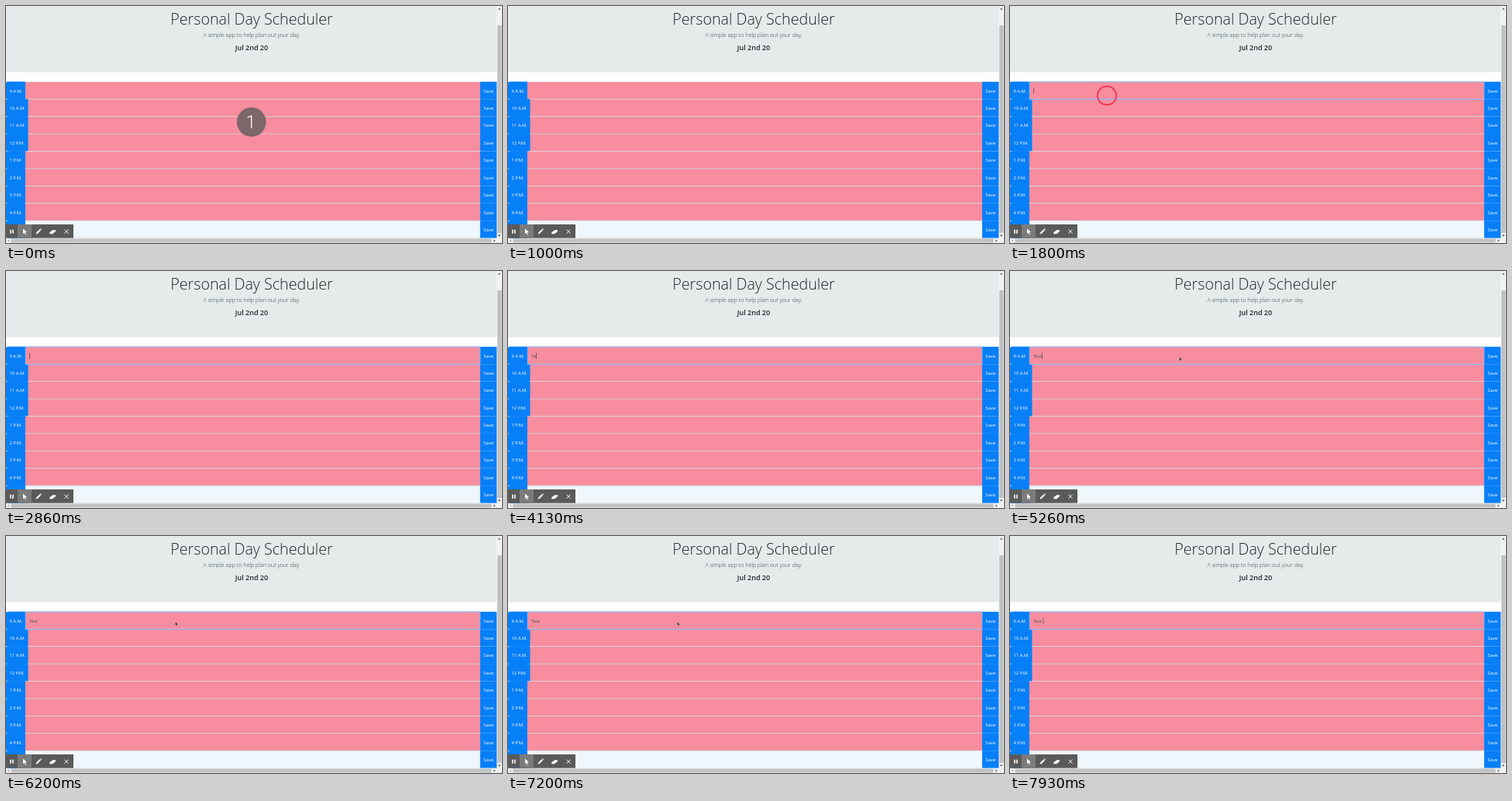
These frames come from a looping animation (640x306 px, 8000 ms). An HTML page:

```html
<!DOCTYPE html>
<html lang="en">
<head>
<meta charset="utf-8">
<title>Personal Day Scheduler</title>
<style>
  html, body { margin: 0; width: 100%; height: 100%; overflow: hidden; background: #fff; }
  svg { display: block; width: 640px; height: 306px; }
  text { font-family: "Open Sans", "Noto Sans", sans-serif; font-size: 5.9px; fill: #fff; }
  .title { font-size: 19.7px; font-weight: 300; fill: #212529; }
  .lead { font-size: 7.15px; font-weight: 300; fill: #343a40; }
  .date { font-size: 9px; font-weight: 600; fill: #212529; }
  .mid { text-anchor: middle; }
  .entry { fill: #495057; white-space: pre; }
  .count { font: 300 23px Roboto, "Open Sans", sans-serif; }
</style>
</head>
<body>
<svg viewBox="0 0 640 306">
  <rect width="640" height="306" fill="#fff"/>
  <rect width="633.5" height="85.5" fill="#e4ebea"/>
  <text class="title mid" x="317" y="24">Personal Day Scheduler</text>
  <text class="lead mid" x="317" y="39.5">A simple app to help plan out your day.</text>
  <text class="date mid" x="317" y="57.2">Jul 2nd 20</text>

  <g id="rows"></g>

  <rect id="focus" x="25.2" y="97.9" width="586.6" height="22.8" fill="none" stroke="#80aef0" stroke-width="1"/>
  <text id="entry" class="entry" x="30" y="111.7"></text>
  <rect id="caret" y="105.6" width=".7" height="7.6" fill="#3d4248"/>

  <g id="scrollbars">
    <rect x="633.5" width="6.5" height="306" fill="#f1f1f1"/>
    <rect x="634" y="25" width="5.6" height="268" fill="#c1c1c1"/>
    <path d="M634.8 4.6l1.8-2.2 1.8 2.2z" fill="#505050"/>
    <path d="M634.8 295.6l1.8 2.2 1.8-2.2z" fill="#505050"/>
    <rect y="300" width="640" height="6" fill="#f1f1f1"/>
    <rect x="6.5" y="300.5" width="620" height="5" fill="#c1c1c1"/>
    <path d="M4 301.3l-2 1.7 2 1.7z" fill="#a3a3a3"/>
    <path d="M629.5 301.3l2 1.7-2 1.7z" fill="#505050"/>
  </g>

  <g id="toolbar" fill="#fff">
    <rect y="282" width="87" height="17.6" fill="#5a5a5a"/>
    <rect x="15" y="282" width="18" height="17.6" fill="#7b7b7b"/>
    <path d="M5.2 288.7h1.6v5h-1.6zM8.2 288.7h1.6v5h-1.6z"/>
    <path d="M22 287.6l5 4.5-2.3.2 1.3 2.6-1 .5-1.3-2.6-1.7 1.5z"/>
    <path d="M38.6 294.6l.5-2 4.4-4.4 1.5 1.5-4.4 4.4zM44 287.7l.6-.6 1.5 1.5-.6.6z"/>
    <path d="M56.3 292.2l4-3h3.7v1.8l-4 3.2h-3.7z"/>
    <path d="M75.5 288.7l5 5m0-5l-5 5" stroke="#fff" stroke-width="1"/>
  </g>

  <circle id="ring" cx="125" cy="115.7" fill="none" stroke="#e8324f" stroke-width="1.7"/>
  <path id="arrow" d="M0 0v4.6l1.1-1 .8 1.7.8-.4-.8-1.6h1.5z" fill="#111" stroke="#fff" stroke-width=".3"/>
  <g id="count">
    <circle cx="316.7" cy="149.8" r="18.9" fill="#7d676b"/>
    <text class="count mid" x="316" y="157.8">1</text>
  </g>
</svg>
<script>
const LOOP = 8000, BLINK = 530, TOP = 97.8, PITCH = 22.42;
const $ = id => document.getElementById(id);
const clamp = x => Math.max(0, Math.min(1, x));
const span = (t, a, b) => clamp((t - a) / (b - a));
const ease = x => x * x * (3 - 2 * x);
const show = (el, on) => { el.style.visibility = on ? "visible" : "hidden"; };

const hours = ["9 A.M.", "10 A.M.", "11 A.M.", "12 P.M.", "1 P.M.", "2 P.M.", "3 P.M.", "4 P.M.", "5 P.M."];
$("rows").innerHTML = hours.map((label, i) => {
  const y = TOP + i * PITCH, w = /^1\d/.test(label) ? 28.4 : 25;
  const fill = i < 8 ? "#f78d9e" : "#eff7fc";
  return `<rect x="${w}" y="${y}" width="${612 - w}" height="${PITCH}" fill="#ced0d8"/>
    <rect x="${w}" y="${y + .45}" width="${612 - w}" height="${PITCH - .9}" fill="${fill}"/>
    <rect y="${y}" width="${w}" height="${PITCH}" rx="1.6" fill="#077ff7"/>
    <rect x="3" y="${y}" width="${w - 3}" height="${PITCH}" fill="#077ff7"/>
    <rect x="611.8" y="${y}" width="21.7" height="${PITCH}" fill="#077ff7"/>
    <text x="4.4" y="${y + 13.8}">${label}</text>
    <text class="mid" x="622.6" y="${y + 13.8}">Save</text>`;
}).join("");

// time, text; each entry restarts the caret blink
const typing = [[1660, ""], [4000, "T"], [4060, "Te"], [4170, "Tes"], [4200, "Test"], [7460, "Test\u00a0"]];

function draw(t) {
  $("count").style.opacity = 1 - span(t, 300, 700);

  const focused = t >= 1660;
  show($("focus"), focused);
  const [since, text] = typing.filter(k => k[0] <= t).pop() || [0, ""];
  const entry = $("entry"), caret = $("caret");
  if (entry.textContent !== text) entry.textContent = text;
  caret.setAttribute("x", 30.1 + (text ? entry.getComputedTextLength() : 0));
  show(caret, focused && Math.floor((t - since) / BLINK) % 2 === 0);

  const ring = $("ring");
  show(ring, t >= 1600 && t < 1930);
  ring.setAttribute("r", 4 + 8 * span(t, 1600, 1780));
  ring.style.opacity = 1 - span(t, 1810, 1930);

  const arrow = $("arrow"), go = ease(span(t, 4760, 5200));
  show(arrow, t >= 4760 && t < 7460);
  arrow.setAttribute("transform", `translate(${125 + 93.6 * go} ${115 - 3.9 * go})`);
}

const start = performance.now();
function tick() {
  draw((performance.now() - start) % LOOP);
  requestAnimationFrame(tick);
}
tick();
</script>
</body>
</html>
```
